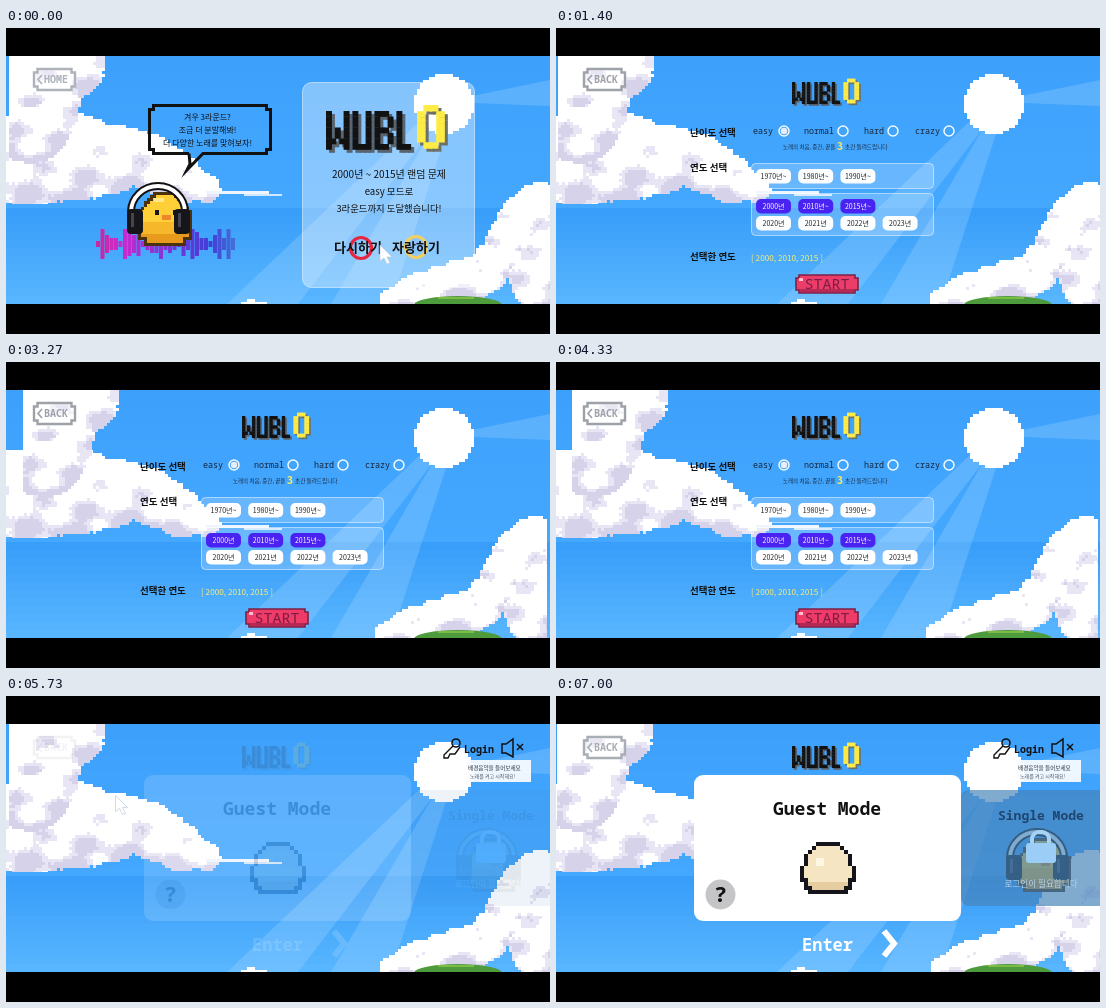
Animation, 544 px wide and 306 px high, one loop 7140 ms. Source, as an HTML page with a canvas:

```html
<!DOCTYPE html>
<html lang="ko">
<head>
<meta charset="utf-8">
<style>
html, body { margin: 0; width: 100%; height: 100%; overflow: hidden; background: #000; }
canvas { display: block; width: 544px; height: 306px; }
</style>
</head>
<body>
<canvas id="stage" width="544" height="306"></canvas>
<script>
const LOOP = 7140, W = 544, H = 306, TOP = 28, BOTTOM = 276, HORIZON = 176;
const SETUP_AT = 430, GUEST_AT = 5650, FADE = 1080;
const KR = '"Noto Sans CJK KR", "Noto Sans CJK", "Noto Sans", sans-serif';
const MONO = '"Noto Sans Mono", "DejaVu Sans Mono", monospace';
const INK = '#111';

function surface() {
  const c = document.createElement('canvas');
  c.width = W; c.height = H;
  return c.getContext('2d');
}
const spare = surface();
let g = document.getElementById('stage').getContext('2d');

// run a painter on another surface
function paintOn(ctx, paint) {
  const main = g;
  g = ctx;
  paint();
  g = main;
  return ctx.canvas;
}
function group(alpha, paint) {
  spare.clearRect(0, 0, W, H);
  const image = paintOn(spare, paint);
  g.globalAlpha = alpha;
  g.drawImage(image, 0, 0);
  g.globalAlpha = 1;
}
const layer = paint => paintOn(surface(), paint);

function rect(color, x, y, w, h) { g.fillStyle = color; g.fillRect(x, y, w, h); }
function text(s, x, y, size, { color = INK, align = 'left', weight = 500, font = KR } = {}) {
  g.font = `${weight} ${size}px ${font}`;
  g.textAlign = align;
  g.fillStyle = color;
  g.fillText(s, x, y);
}
function ink(fill, stroke, line = 1) {
  if (fill) { g.fillStyle = fill; g.fill(); }
  if (stroke) { g.strokeStyle = stroke; g.lineWidth = line; g.stroke(); }
}
function box(x, y, w, h, r, ...style) {
  g.beginPath(); g.roundRect(x, y, w, h, r); ink(...style);
}
function disc(x, y, r, ...style) {
  g.beginPath(); g.arc(x, y, r, 0, 7); ink(...style);
}
function path(points, closed, ...style) {
  g.beginPath();
  points.forEach(p => g.lineTo(...p));
  if (closed) g.closePath();
  ink(...style);
}
// box with stepped corners
function notched(x, y, w, h, c, ...style) {
  const r = x + w, b = y + h;
  path([[x + c, y], [r - c, y], [r - c, y + c], [r, y + c], [r, b - c], [r - c, b - c],
    [r - c, b], [x + c, b], [x + c, b - c], [x, b - c], [x, y + c], [x + c, y + c]], true, ...style);
}
// blocky solid of revolution: halfWidth(v) for v from 0 to 1
function blob(cx, y, h, cell, halfWidth, color) {
  for (let d = 0; d < h; d += cell) {
    const w = Math.round(halfWidth((d + cell / 2) / h) / cell) * cell;
    rect(typeof color === 'string' ? color : color(d / h), cx - w, y + d, w * 2, cell);
  }
}
const round = r => v => r * Math.sqrt(Math.max(0, 1 - (2 * v - 1) ** 2));
const ovoid = r => v => r * Math.sqrt(Math.max(0, 1 - ((v - .6) / (v < .6 ? .64 : .56)) ** 2));

function random(seed) {
  return () => (seed = (seed * 16807) % 2147483647) / 2147483647;
}

// puffs strung along a few key points [x, y, radius]
function cloud(keys, seed, limit) {
  const rnd = random(seed), puffs = [], s = 3;
  for (let i = 0; i < keys.length - 1; i++) for (let k = 0; k < 1; k += .25) {
    const [x, y, r] = keys[i].map((v, n) => v + (keys[i + 1][n] - v) * k);
    puffs.push([x + (rnd() - .5) * r * .3, y + (rnd() - .5) * r * .3, r * (.8 + rnd() * .3)]);
  }
  for (let y = 1; y < limit; y += s) for (let x = -60; x < W + 30; x += s) {
    let depth = -1, low = 0;
    for (const [px, py, r] of puffs) {
      const d = r - Math.hypot(x - px, y - py) + rnd() * 1.5;
      if (d > depth) { depth = d; low = (y - py) / r; }
    }
    if (depth < 0) continue;
    const n = low + .45 * Math.sin(x * .13 + y * .07) + .35 * Math.sin(y * .21 - x * .05) + rnd() * .2;
    rect(n > .85 ? '#d6d2ea' : n > .5 ? '#e8e5f4' : '#fff', x, y, s, Math.min(s, limit - y));
  }
}

const sky = layer(() => {
  for (let y = TOP; y < BOTTOM; y += 8) {
    const k = (y - TOP) / (HORIZON - TOP), m = (y - HORIZON) / (BOTTOM - HORIZON);
    rect(m < 0 ? `rgb(${61 + 8 * k},${160 + 8 * k},${251 + 4 * k})` : `rgb(${55 + 36 * m},${157 + 26 * m},${249 + 6 * m})`, 0, y, W, 8);
  }
  const beam = 'rgba(165,216,255,.28)';
  path([[415, 92], [425, 103], [292, 276], [221, 276]], true, beam);
  path([[426, 102], [440, 106], [385, 276], [325, 276]], true, beam);
  path([[466, 68], [544, 52], [544, 78], [466, 75]], true, beam);
  blob(438, 46, 60, 3, round(30), '#fff');
});
const midCloud = layer(() => {
  cloud([[10, 130, 48], [80, 130, 42], [134, 124, 28], [168, 150, 22], [208, 160, 10]], 11, HORIZON);
  rect('#eef5ff', 200, 163, 63, 3);
  rect('#cfe7ff', 238, 166, 38, 2);
});
const topCloud = layer(() => cloud([[-30, 95, 45], [35, 85, 40], [25, 45, 45], [75, 30, 30]], 5, HORIZON));
const rightCloud = layer(() => cloud([[384, 272, 12], [418, 258, 20], [478, 245, 24], [512, 195, 24], [532, 188, 30], [550, 250, 60]], 23, BOTTOM));

const cycle = t => (1 - Math.cos(2 * Math.PI * (t - 800) / 5700)) / 2;
function backdrop(t) {
  const c = cycle(t);
  g.drawImage(sky, 0, 0);
  g.drawImage(midCloud, 0, 0);
  g.drawImage(topCloud, Math.round(18 * c), 0);
  g.drawImage(rightCloud, Math.round(3 - 6 * c), 0);
  g.beginPath(); g.ellipse(452, 277, 44, 9, 0, 0, 7); ink('#4e9b3d');
  rect('#7cbc45', 432, 269, 36, 2);
  rect('#fff', 235, 274, 26, 2);
  rect('#fff', 241, 271, 8, 3);
}

const GLYPHS = {
  W: '#...# #...# #...# #.#.# #.#.# ##.## #...#',
  U: '#..# #..# #..# #..# #..# #..# ####',
  B: '###. #..# #..# ###. #..# #..# ###.',
  L: '#.. #.. #.. #.. #.. #.. ###',
  O: '.##. #..# #..# #..# #..# #..# .##.'
};
function glyph(ch, x, y, cw, rh, color) {
  const rows = GLYPHS[ch].split(' ');
  rows.forEach((row, j) => [...row].forEach((p, i) => {
    if (p === '#') rect(color, x + i * cw, y + j * rh, cw * 1.35, rh + .3);
  }));
  return (rows[0].length + 1) * cw;
}
function title(x, y, k) {
  for (const [d, dark, hot] of [[3 * k, '#59646f', '#6e7266'], [0, '#121212', '#ffeb45']]) {
    let pen = x + d;
    for (const ch of 'WUBL') pen += glyph(ch, pen, y + d, 4.4 * k, 5.5 * k, dark);
    glyph('O', x + 91 * k + d, y - 6 * k + d, 6.4 * k, 6.2 * k, hot);
  }
}

function navButton(label, color) {
  notched(28, 41, 41, 21, 3.5, 'rgba(255,255,255,.45)', color, 2.4);
  path([[36, 47], [32, 51.5], [36, 56]], false, null, color, 1.7);
  text(label, 38, 55, 10, { color, weight: 600, font: MONO });
}

function speech() {
  const x = 143.5, y = 77.5, r = 264.5, b = 125.5, c = 4;
  path([[183, b], [x + c, b], [x + c, b - c], [x, b - c], [x, y + c], [x + c, y + c], [x + c, y], [r - c, y],
    [r - c, y + c], [r, y + c], [r, b - c], [r - c, b - c], [r - c, b], [197, b], [181, 142], [184, 136], [183, b]], false, null, INK, 3);
  ['겨우 3라운드?', '조금 더 분발해봐!', '더 다양한 노래를 맞혀보자!'].forEach((s, i) =>
    text(s, 201.5, 92 + i * 13, 8, { align: 'center' }));
}

function equalizer() {
  for (let i = 0; i < 31; i++) {
    const h = 3 * Math.round(1 + 4.5 * Math.abs(Math.sin(i * 1.9) * Math.cos(i * .45)));
    rect(`hsl(${315 - i * 3} 65% ${47 + i * .3}%)`, 90 + i * 4.5, 216 - h, 4, h * 2);
  }
}
function mascot() {
  const body = v => 26 * Math.min(1, 1.6 * Math.sqrt(v + .04)) * (v > .88 ? .8 : 1);
  blob(159, 164, 54, 3, body, '#4a3210');
  blob(159, 167, 48, 3, v => body(v) - 3, v => v > .75 ? '#e89a1c' : v > .5 ? '#f7b72a' : '#ffcf38');
  rect('#ffe78a', 148, 170, 10, 4);
  for (const x of [149, 167]) rect('#1a1512', x, 182, 4, 5);
  rect('#f0862b', 156, 187, 9, 5);
  for (const [color, line] of [[INK, 8], ['#fff', 4]]) {
    g.beginPath(); g.ellipse(152, 184, 27, 26, 0, Math.PI, 0); ink(null, color, line);
  }
  for (const x of [121, 168]) {
    box(x, 181, 16, 25, 4, '#15151a');
    rect('#45454f', x + 4, 185, 3, 14);
  }
}

function resultPage() {
  navButton('HOME', '#aeb2ba');
  speech();
  equalizer();
  mascot();
  box(296.5, 54.5, 172, 205, 9, 'rgba(255,255,255,.36)', 'rgba(255,255,255,.5)');
  title(320, 83, 1);
  const mid = { align: 'center' };
  text('2000년 ~ 2015년 랜덤 문제', 383, 150, 10, mid);
  text('easy 모드로', 383, 167, 9.6, mid);
  text('3라운드까지 도달했습니다!', 383, 184, 9.4, mid);
  disc(355, 220, 10.5, null, '#e8263d', 3.2);
  disc(410, 219, 10.5, null, '#f3cf62', 3.2);
  text('다시하기', 328, 224, 13, { weight: 700 });
  text('자랑하기', 386, 224, 13, { weight: 700 });
}

function chips(y, labels, on) {
  labels.split(' ').forEach((s, i) => {
    const x = 200 + i * 42.2;
    box(x, y, 35, 14.5, 5, on ? '#4a22f2' : '#fff');
    text(s, x + 17.5, y + 10, 7, { align: 'center', color: on ? '#fff' : '#222' });
  });
}
function radio(label, x, cx, on) {
  text(label, x, 106, 8.4, { color: '#16243a', font: MONO });
  disc(cx, 103, 5, null, '#f4faff', 1.5);
  if (on) disc(cx, 103, 3.2, '#e9eef5');
}

function setupPage(hover) {
  navButton('BACK', hover ? '#60646b' : '#9da1a8');
  title(236, 54, .565);
  const bold = { weight: 700 }, small = { color: '#1b2a40' };
  text('난이도 선택', 134, 108, 9.5, bold);
  text('연도 선택', 134, 143, 9.5, bold);
  text('선택한 연도', 134, 232, 9.5, bold);
  radio('easy', 197, 228, true);
  radio('normal', 248, 287);
  radio('hard', 308, 337);
  radio('crazy', 359, 393);
  text('노래의 처음, 중간, 끝을', 227, 121, 5.5, small);
  text('3', 281, 122, 10, { color: '#ffee55', weight: 700 });
  text('초간 들려드립니다', 289, 121, 5.6, small);
  for (const [y, h] of [[135.5, 25], [165.5, 42]]) box(195.5, y, 182, h, 4, 'rgba(255,255,255,.2)', 'rgba(255,255,255,.5)');
  chips(141, '1970년~ 1980년~ 1990년~');
  chips(171, '2000년 2010년~ 2015년~', true);
  chips(188, '2020년 2021년 2022년 2023년');
  text('[ 2000, 2010, 2015 ]', 195, 233, 8.2, { color: '#ffec70' });
  notched(240, 247, 62, 18, 3, '#ee3b67', '#7b2147', 1.6);
  rect('#b92853', 244, 261, 54, 3);
  rect('#ffc2d0', 243, 250, 4, 3);
  text('START', 271, 261, 15, { align: 'center', color: '#7d1c47', font: MONO });
}

function lockedCard() {
  g.save();
  g.translate(329, -22);
  mascot();
  g.restore();
  box(405, 94, 150, 116, 8, 'rgba(70,130,184,.68)');
  text('Single Mode', 442, 124, 13, { weight: 700, font: MONO, color: '#20466f' });
  box(476, 136, 17, 22, 7, null, '#a5d2f5', 4);
  box(470, 147, 30, 20, 3, '#9bcdf6');
  text('로그인이 필요합니다', 485, 191, 8.6, { align: 'center', color: '#b4d3ec' });
}
function account() {
  disc(450, 47, 4, null, INK, 1.6);
  path([[447, 50], [438, 59], [438, 62], [442, 62], [444, 58], [449, 58], [454, 51]], false, null, INK, 1.4);
  text('Login', 458, 57, 10, { weight: 700, font: MONO });
  path([[496, 48], [500, 48], [507, 43], [507, 61], [500, 57], [496, 57]], true, null, INK, 1.5);
  path([[511, 48], [517, 54]], false, null, INK, 1.5);
  path([[517, 48], [511, 54]], false, null, INK, 1.5);
  rect('rgba(250,253,255,.93)', 461, 64, 64, 22);
  text('배경음악을 들어보세요', 462, 74, 5.6, { color: '#334' });
  text('노래를 켜고 시작해요!', 464, 82, 5, { color: '#556' });
}
function guestPage() {
  lockedCard();
  navButton('BACK', '#a9adb4');
  title(236, 50, .565);
  box(138, 79, 267, 146, 9, '#fff');
  text('Guest Mode', 217, 119, 18, { weight: 700, font: MONO });
  blob(272, 146, 52, 4, ovoid(27), '#15131c');
  blob(272, 150, 44, 4, ovoid(23), v => v > .75 ? '#e6cda1' : '#f6e5c3');
  rect('#fff7e4', 260, 162, 8, 8);
  disc(164.5, 198.5, 15, '#c5c5c7');
  text('?', 164.5, 206, 22, { align: 'center', weight: 800, font: MONO });
  text('Enter', 246, 255, 17, { weight: 700, font: MONO, color: '#fff' });
  path([[328, 235], [338, 247.5], [328, 260]], false, null, '#fff', 6);
}

// pointer trips: start, end, from, to; it rests at the end until hide
const TRIPS = [
  { start: 0, end: 600, from: [374, 217], to: [347, 220], hide: 1400 },
  { start: 4470, end: 5250, from: [300, 270], to: [70, 62], hide: 5600 },
  { start: 5600, end: 6000, from: [70, 62], to: [227, 211], hide: 6500 }
];
function pointer(t) {
  const trip = TRIPS.find(p => t >= p.start && t < p.hide);
  if (!trip) return;
  const p = Math.min(1, (t - trip.start) / (trip.end - trip.start)), k = p * p * (3 - 2 * p);
  const [x, y] = trip.from.map((v, i) => v + (trip.to[i] - v) * k);
  const hand = x < 78 && y < 70;
  const outline = hand
    ? [[0, 1], [2, 0], [4, 2], [5, 7], [13, 9], [13, 14], [11, 18], [4, 18], [-2, 11], [2, 10]]
    : [[0, 0], [0, 16], [4, 13], [7, 19], [10, 18], [7, 12], [12, 12]];
  path(outline.map(([a, b]) => [x + a, y + b]), true, '#fff', hand ? INK : '#bccbdd', hand ? 1.2 : .7);
}

const appear = (t, start) => 1 - (1 - Math.min(1, (t - start) / FADE)) ** 2;

function draw(t) {
  rect('#000', 0, 0, W, H);
  g.save();
  g.beginPath(); g.rect(0, TOP, W, BOTTOM - TOP); g.clip();
  backdrop(t);
  if (t < SETUP_AT) resultPage();
  else if (t < GUEST_AT) group(appear(t, SETUP_AT), () => setupPage(t > 5180));
  else {
    group(appear(t, GUEST_AT), guestPage);
    account();
  }
  pointer(t);
  g.restore();
}
const begin = performance.now();
function tick() {
  draw((performance.now() - begin) % LOOP);
  requestAnimationFrame(tick);
}
tick();
</script>
</body>
</html>
```
